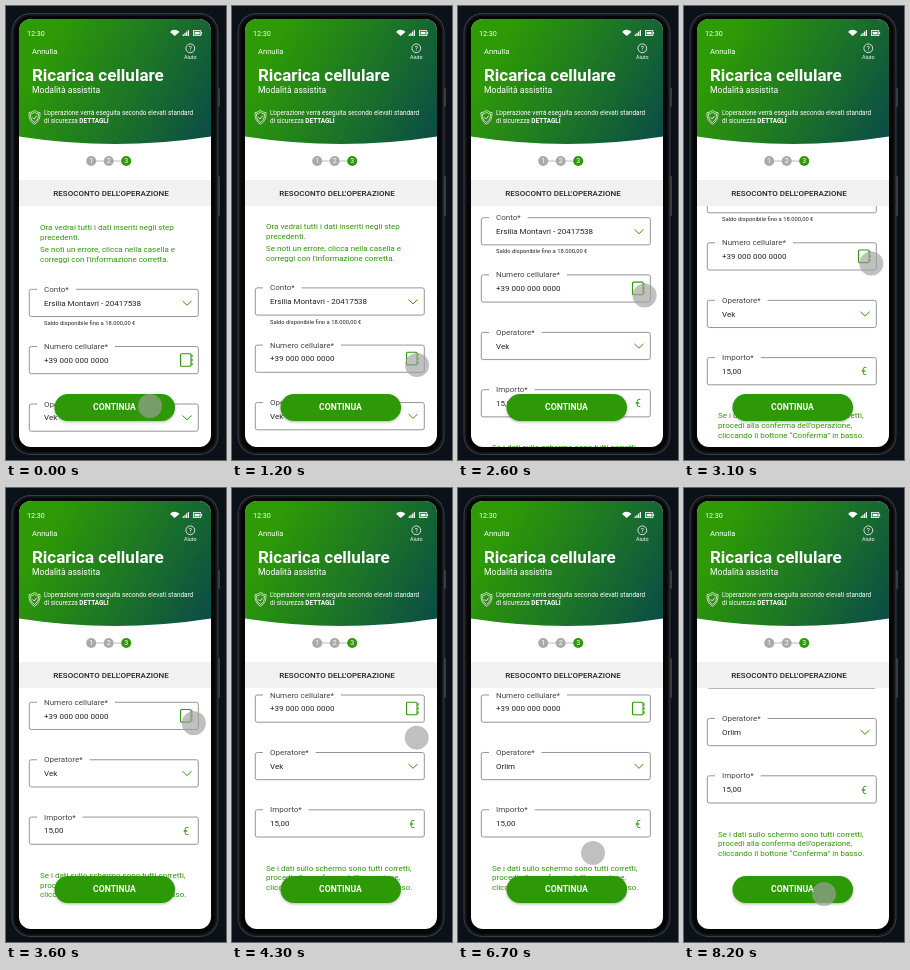
An HTML page with a canvas for the animation above (8300 ms loop, 220 by 454 pixels).

```html
<!DOCTYPE html>
<html lang="it">
<head>
<meta charset="utf-8">
<title>Ricarica cellulare</title>
<style>
  html, body { margin: 0; width: 100%; height: 100%; overflow: hidden; background: #0b1119; }
  canvas { display: block; width: 220px; height: 454px; }
</style>
</head>
<body>
<canvas id="stage"></canvas>
<script>
const W = 220, H = 454, LOOP = 8300;
const GREEN = '#2e9906', INK = '#222', SOFT = '#444', LINE = '#8a8a8a';
const canvas = document.getElementById('stage');
const ctx = canvas.getContext('2d');
const dpr = window.devicePixelRatio || 1;
canvas.width = W * dpr;
canvas.height = H * dpr;

// Pointer stops: [time, x, y]; it eases from one to the next.
const stops = [
  [0, 144, 400], [900, 185, 360.5], [1000, 185, 360.5],
  [4060, 188, 228], [4600, 180, 280], [5050, 180, 280],
  [5650, 135, 331], [6150, 135, 331], [6650, 135, 365], [6700, 135, 365],
  [7700, 135, 331], [8200, 140, 406]
];
const MENU_OPEN = 5100, MENU_CLOSE = 5800;

const ease = (t, from, to) => {
  const u = Math.min(1, Math.max(0, (t - from) / (to - from)));
  return (1 - Math.cos(Math.PI * u)) / 2;
};
const scrollAt = t => 133.5 * ease(t, 1000, 4060) + 34 * ease(t, 6700, 7700);

function pointerAt(t) {
  let [, x, y] = stops[0];
  for (let i = 1; i < stops.length; i++) {
    const a = stops[i - 1], b = stops[i], k = ease(t, a[0], b[0]);
    x += (b[1] - a[1]) * k;
    y += (b[2] - a[2]) * k;
  }
  return [x, y];
}

// Text placed by the middle of its capital height.
function text(str, x, y, size = 8, color = INK, weight = 400, align = 'left') {
  ctx.font = `${weight} ${size}px Roboto, Arial, sans-serif`;
  ctx.textAlign = align;
  ctx.fillStyle = color;
  ctx.fillText(str, x, y + size * 0.355);
}

function fillRound(x, y, w, h, r, color) {
  ctx.beginPath();
  ctx.roundRect(x, y, w, h, r);
  ctx.fillStyle = color;
  ctx.fill();
}

function disc(x, y, r, color) {
  ctx.beginPath();
  ctx.arc(x, y, r, 0, Math.PI * 2);
  ctx.fillStyle = color;
  ctx.fill();
}

function stroke(points, color, width = 1) {
  ctx.beginPath();
  points.forEach(([x, y], i) => i ? ctx.lineTo(x, y) : ctx.moveTo(x, y));
  ctx.strokeStyle = color;
  ctx.lineWidth = width;
  ctx.stroke();
}

function shadow(color, blur, dy) {
  ctx.shadowColor = color;
  ctx.shadowBlur = blur * dpr;
  ctx.shadowOffsetY = dy * dpr;
}

function field(label, value, y) {
  text(label, 38, y - 0.3, 8, SOFT);
  const end = 38 + ctx.measureText(label).width + 7;
  ctx.beginPath();
  ctx.moveTo(31, y);
  ctx.lineTo(25.5, y);
  ctx.arcTo(23.3, y, 23.3, y + 2, 2);
  ctx.arcTo(23.3, y + 27.2, 26, y + 27.2, 2);
  ctx.arcTo(192.3, y + 27.2, 192.3, y + 25, 2);
  ctx.arcTo(192.3, y, 190, y, 2);
  ctx.lineTo(end, y);
  ctx.strokeStyle = LINE;
  ctx.lineWidth = 0.9;
  ctx.stroke();
  text(value, 38, y + 13.5);
}

const chevron = y => stroke([[176.5, y - 2], [181, y + 2.3], [185.5, y - 2]], GREEN, 1);

function contacts(y) {
  ctx.strokeStyle = GREEN;
  ctx.lineWidth = 1.1;
  ctx.beginPath();
  ctx.roundRect(174.5, y - 6.3, 10.5, 12.6, 1);
  ctx.stroke();
  for (let i = -1; i <= 1; i++) stroke([[186, y + i * 4 - 1.3], [186, y + i * 4 + 1.3]], GREEN, 1.2);
}

function drawForm(t) {
  const operator = t < MENU_CLOSE ? 'Vek' : 'Orlim';
  ctx.save();
  ctx.beginPath();
  ctx.rect(13, 200, 192, 242);
  ctx.clip();
  ctx.translate(0, -scrollAt(t));

  text('Ora vedrai tutti i dati inseriti negli step', 34, 221.3, 8, GREEN);
  text('precedenti.', 34, 231.3, 8, GREEN);
  text('Se noti un errore, clicca nella casella e', 34, 243.3, 8, GREEN);
  text("correggi con l'informazione corretta.", 34, 253.3, 8, GREEN);

  field('Conto*', 'Ersilia Montavri - 20417538', 283.3);
  chevron(297);
  text('Saldo disponibile fino a 18.000,00 €', 38, 317, 5.8);
  field('Numero cellulare*', '+39 000 000 0000', 340.5);
  contacts(354);
  field('Operatore*', operator, 398);
  chevron(411.5);
  field('Importo*', '15,00', 455.3);
  text('€', 180, 469.5, 10, GREEN, 400, 'center');

  text('Se i dati sullo schermo sono tutti corretti,', 34, 513.2, 8, GREEN);
  text("procedi alla conferma dell'operazione,", 34, 523, 8, GREEN);
  text('cliccando il bottone “Conferma” in basso.', 34, 532.8, 8, GREEN);

  if (t >= MENU_OPEN && t < MENU_CLOSE) {
    ctx.save();
    shadow('rgba(0,0,0,.35)', 3, 1);
    fillRound(23.5, 426, 169.5, 54.5, 1, '#f1f1f1');
    ctx.restore();
    text('Vek', 39, 439);
    stroke([[39, 450.5], [175, 450.5]], '#bbb', 0.8);
    text('Orlim', 39, 464);
  }
  ctx.restore();
}

function drawStatus() {
  text('12:30', 21, 27, 7.2, '#fff');
  ctx.fillStyle = '#fff';
  ctx.beginPath();
  ctx.moveTo(168.7, 30);
  ctx.arc(168.7, 30, 6.2, -Math.PI * 0.77, -Math.PI * 0.23);
  ctx.fill();
  for (let i = 0; i < 4; i++) ctx.fillRect(176.7 + i * 1.7, 28.3 - i * 1.4, 1.2, 1.7 + i * 1.4);
  ctx.strokeStyle = '#fff';
  ctx.lineWidth = 0.8;
  ctx.strokeRect(187.4, 24.6, 7.4, 5);
  ctx.fillRect(188.6, 25.8, 5, 2.6);
  ctx.fillRect(195.2, 26, 0.9, 2.2);
}

function shieldPath(x, y, k) {
  ctx.beginPath();
  ctx.moveTo(x, y - 7 * k);
  ctx.quadraticCurveTo(x + 2.5 * k, y - 4.7 * k, x + 5.5 * k, y - 4.7 * k);
  ctx.quadraticCurveTo(x + 6 * k, y + 3.5 * k, x, y + 7 * k);
  ctx.quadraticCurveTo(x - 6 * k, y + 3.5 * k, x - 5.5 * k, y - 4.7 * k);
  ctx.quadraticCurveTo(x - 2.5 * k, y - 4.7 * k, x, y - 7 * k);
}

function drawHeader() {
  const g = ctx.createLinearGradient(45, 35, 203, 122);
  g.addColorStop(0, '#2d9a06');
  g.addColorStop(0.5, '#1d7725');
  g.addColorStop(1, '#0c4e45');
  ctx.fillStyle = g;
  ctx.beginPath();
  ctx.moveTo(13, 13);
  ctx.lineTo(205, 13);
  ctx.lineTo(205, 130.5);
  ctx.quadraticCurveTo(109, 145.5, 13, 130.5);
  ctx.fill();

  drawStatus();
  text('Annulla', 26, 45.3, 7.6, '#fff');
  ctx.beginPath();
  ctx.arc(184.3, 42.3, 4.4, 0, Math.PI * 2);
  ctx.strokeStyle = '#fff';
  ctx.lineWidth = 0.8;
  ctx.stroke();
  text('?', 184.3, 42.3, 6.5, '#fff', 400, 'center');
  text('Aiuto', 184.3, 51, 5.4, '#fff', 400, 'center');
  text('Ricarica cellulare', 26, 68.8, 17, '#fff', 700);
  text('Modalità assistita', 26, 84.3, 8.6, '#fff');

  ctx.strokeStyle = '#fff';
  ctx.lineWidth = 0.7;
  for (const k of [1, 0.72]) {
    shieldPath(28.5, 111.3, k);
    ctx.stroke();
  }
  stroke([[26.6, 111.3], [28.2, 113], [30.8, 109.6]], '#fff', 0.8);
  text("L'operazione verrà eseguita secondo elevati standard", 38, 107.2, 6.4, '#fff');
  text('di sicurezza ', 38, 115, 6.4, '#fff');
  text('DETTAGLI', 38 + ctx.measureText('di sicurezza ').width, 115, 6.4, '#fff', 700);
}

function drawSteps() {
  stroke([[85, 155], [120, 155]], '#b5b5b5', 0.9);
  for (let i = 0; i < 3; i++) {
    const x = 85.2 + i * 17.5;
    disc(x, 155, 5, i === 2 ? GREEN : '#aaa');
    text(i + 1, x, 155, 7, '#fff', 400, 'center');
  }
  ctx.fillStyle = '#f1f1f1';
  ctx.fillRect(13, 174, 192, 26);
  text("RESOCONTO DELL'OPERAZIONE", 105, 186.8, 8, INK, 500, 'center');
}

function drawButton() {
  ctx.save();
  shadow('rgba(0,0,0,.3)', 3, 1);
  fillRound(48.5, 388, 120.5, 27, 13.5, GREEN);
  ctx.restore();
  text('CONTINUA', 108.5, 401.2, 8.6, '#fff', 700, 'center');
}

function drawPhone() {
  ctx.fillStyle = '#0b1119';
  ctx.fillRect(0, 0, W, H);
  fillRound(212, 82, 2, 19, 1, '#3a3d42');
  fillRound(212, 170, 2, 40, 1, '#3a3d42');
  fillRound(5.5, 7, 207, 442, 19, '#3a3d42');
  fillRound(6.5, 8, 205, 440, 18, '#141619');
  fillRound(8.5, 10, 201, 436, 16, '#050608');
}

function draw(t) {
  ctx.setTransform(dpr, 0, 0, dpr, 0, 0);
  drawPhone();
  ctx.save();
  ctx.beginPath();
  ctx.roundRect(13, 13, 192, 428, 12);
  ctx.clip();
  ctx.fillStyle = '#fff';
  ctx.fillRect(13, 13, 192, 429);
  drawForm(t);
  drawHeader();
  drawSteps();
  drawButton();
  ctx.restore();

  const [x, y] = pointerAt(t);
  disc(x, y, 12, 'rgba(160,160,160,.66)');
}

const start = performance.now();
function tick() {
  draw((performance.now() - start) % LOOP);
  requestAnimationFrame(tick);
}
tick();
</script>
</body>
</html>
```
